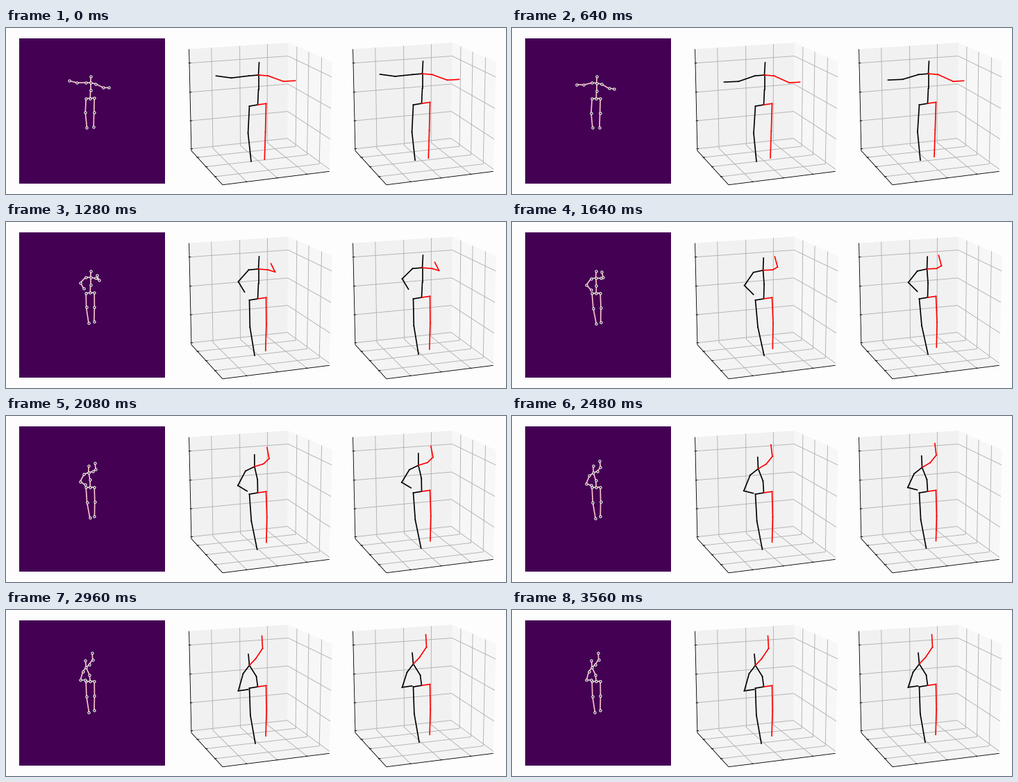
A matplotlib script for the animation above (3.6 s loop, 720 by 240 pixels).

```python
import numpy as np
import matplotlib.pyplot as plt
from matplotlib.animation import FuncAnimation
from matplotlib.collections import LineCollection
from matplotlib.patches import Polygon, Rectangle

WIDTH, HEIGHT, DPI = 720, 240, 80
FRAMES, STEP = 90, 40
THIN, THICK = 0.8, 1.5

# Perspective view of the unit box
ELEV, AZIM, DIST, SCALE = np.radians(15), np.radians(70), 7.5, 1135
CENTER = np.array([362.4, 117])
PANEL_STEP = 236
EDGE = 0.5 + 1 / 48
FLAT_TICKS = [-0.5 / 1.7, 0, 0.5 / 1.7]
HIGH_TICKS = [z / 1.7 - 0.5 for z in (0, 0.5, 1, 1.5)]

HIP = np.array([362.5, 111])
IMAGE_HIP = np.array([121.2, 101.5])

CHAINS = [
    ["hip", "l_hip", "l_knee", "l_foot"],
    ["hip", "spine", "thorax", "head"],
    ["thorax", "l_shoulder", "l_elbow", "l_wrist"],
    ["hip", "r_hip", "r_knee", "r_foot"],
    ["thorax", "r_shoulder", "r_elbow", "r_wrist"],
]
BONES = [bone for chain in CHAINS for bone in zip(chain, chain[1:])]

# Key poses: spread arms, sag, fold, raise, reach over a bow
POSE_TIMES = [0, 640, 1280, 1640, 2960]
BODY = {
    "bow": [0, 0, 0, 0.15, 1],
    "stride": [1, 0, 6, 11, 7],
    "lift": [0, 2, 4, 7, 8],
}
ARMS = {
    "l_upper": [(-25, 3), (-23, 8), (-15, 17), (-13, 19), (-7, 25)],
    "l_fore": [(-22, -3), (-21, 1), (9, 15), (13, 13), (14, -2)],
    "r_upper": [(22, 8), (22, 10), (10, 3), (7, -4), (10, -15)],
    "r_fore": [(17, -1), (15, -1), (-6, -12), (-4, -15), (-1, -18)],
}


def between(keys, ms):
    return np.interp(ms, POSE_TIMES, keys)


def build(ms, arm_drop=1):
    """Joints relative to the hip: right, down, toward the viewer."""
    bow, stride, lift = (between(keys, ms) for keys in BODY.values())
    tilt = np.radians(50) * bow
    joints = {
        "hip": (0, 0, 0),
        "spine": (1 - 3 * bow, -22 + 4 * bow, 3 * bow),
        "thorax": (1 - 13 * bow, -43 + 6 * bow, 6 * bow),
        "head": (2 - 15.5 * bow, -61 + 4 * bow, 10 * bow),
        "l_hip": (-12, 2, 0),
        "l_knee": (-14.5 + 0.55 * stride, 41 + lift / 4, -lift / 4),
        "l_foot": (-10.5 + stride, 82 + lift / 2, -lift / 2),
        "r_hip": (12, -1.7, 0),
        "r_knee": (10.8 + 0.25 * stride, 39, -lift / 2),
        "r_foot": (9.5 + 0.3 * stride, 79, -lift),
    }
    joints = {name: np.array(place, float) for name, place in joints.items()}
    for side, sign, drop in (("l", -1, arm_drop), ("r", 1, 1)):
        shoulder = (14 * sign * np.cos(tilt), 1.2 - 14 * sign * np.sin(tilt), 0)
        upper, fore = ([between(axis, ms) for axis in zip(*ARMS[f"{side}_{part}"])]
                       for part in ("upper", "fore"))
        joints[f"{side}_shoulder"] = joints["thorax"] + shoulder
        joints[f"{side}_elbow"] = joints[f"{side}_shoulder"] + (upper[0], upper[1] * drop, 0)
        joints[f"{side}_wrist"] = joints[f"{side}_elbow"] + (*fore, 0)
    return joints


def box_view(ms, shift=(0, 0), arm_drop=1):
    """Seen from above, points nearer the viewer sit lower."""
    return {name: HIP + shift + (x, y + near)
            for name, (x, y, near) in build(ms, arm_drop).items()}


def image_view(ms):
    """Half-size front view, slowly sinking in the picture."""
    sink = 0.2 * between(BODY["lift"], ms)
    return {name: IMAGE_HIP + (0.5 * x, 0.52 * (y + 0.11 * x) + sink)
            for name, (x, y, _) in build(ms).items()}


def views(frame):
    ms = frame * STEP
    return image_view(ms), box_view(ms), box_view(ms, (PANEL_STEP, -1.9), 0.87)


def project(point):
    ca, sa, ce, se = np.cos(AZIM), np.sin(AZIM), np.cos(ELEV), np.sin(ELEV)
    x, y, z = point
    depth = DIST - (x * ca * ce + y * sa * ce + z * se)
    across = -x * sa + y * ca
    up = -x * ca * se - y * sa * se + z * ce
    return CENTER + SCALE * np.array([across, -up]) / depth


def draw_box(ax, shift):
    def flat(points):
        return np.array([project(p) for p in points]) + [shift, 0]

    def lines(paths, color, order):
        ax.add_collection(LineCollection([flat(p) for p in paths], colors=color,
                                         linewidths=THIN, zorder=order))

    e = EDGE
    right_wall = [(-e, -e, -e), (-e, e, -e), (-e, e, e), (-e, -e, e)]
    left_wall = [(-e, -e, -e), (e, -e, -e), (e, -e, e), (-e, -e, e)]
    floor = [(-e, -e, -e), (e, -e, -e), (e, e, -e), (-e, e, -e)]
    for pane, grey in ((right_wall, 0.95), (left_wall, 0.9), (floor, 0.925)):
        ax.add_patch(Polygon(flat(pane), facecolor=(grey, grey, grey, 0.5),
                             edgecolor="none", zorder=1))

    grid = [[(t, -e, e), (t, -e, -e), (t, e, -e)] for t in FLAT_TICKS]
    grid += [[(-e, t, e), (-e, t, -e), (e, t, -e)] for t in FLAT_TICKS]
    grid += [[(e, -e, t), (-e, -e, t), (-e, e, t)] for t in HIGH_TICKS]
    lines(grid, "#b0b0b0", 2)

    outer, inner = e + 0.1 / 12, e - 0.2 / 12
    axes = [[(e, -e, e), (e, -e, -e)], [(e, -e, -e), (e, e, -e)], [(e, e, -e), (-e, e, -e)]]
    ticks = [[(t, outer, -e), (t, inner, -e)] for t in FLAT_TICKS]
    ticks += [[(outer, t, -e), (inner, t, -e)] for t in FLAT_TICKS]
    ticks += [[(outer, -e, t), (inner, -e, t)] for t in HIGH_TICKS]
    lines(axes + ticks, "black", 3)


fig = plt.figure(figsize=(WIDTH / DPI, HEIGHT / DPI), dpi=DPI, facecolor="#fdfdfd")
ax = fig.add_axes([0, 0, 1, 1])
ax.set_xlim(0, WIDTH)
ax.set_ylim(HEIGHT, 0)
ax.axis("off")

ax.add_patch(Rectangle((19, 15), 210, 210, facecolor="#440154", edgecolor="none"))
for shift in (0, PANEL_STEP):
    draw_box(ax, shift)

side_colors = ["red" if end.startswith("r_") else "black" for _, end in BONES]
skeletons = [
    ax.add_collection(LineCollection([], colors=colors, linewidths=THICK,
                                     capstyle="projecting", zorder=5))
    for colors in ("pink", side_colors, side_colors)
]
dots = ax.scatter([], [], s=8, facecolor="black", edgecolors="white",
                  linewidths=1, zorder=10)


def update(frame):
    poses = views(frame)
    for bones, joints in zip(skeletons, poses):
        bones.set_segments([(joints[a], joints[b]) for a, b in BONES])
    dots.set_offsets(list(poses[0].values()))
    return [*skeletons, dots]


anim = FuncAnimation(fig, update, frames=FRAMES, interval=STEP, repeat=True,
                     repeat_delay=0, blit=False)
plt.show()
```
